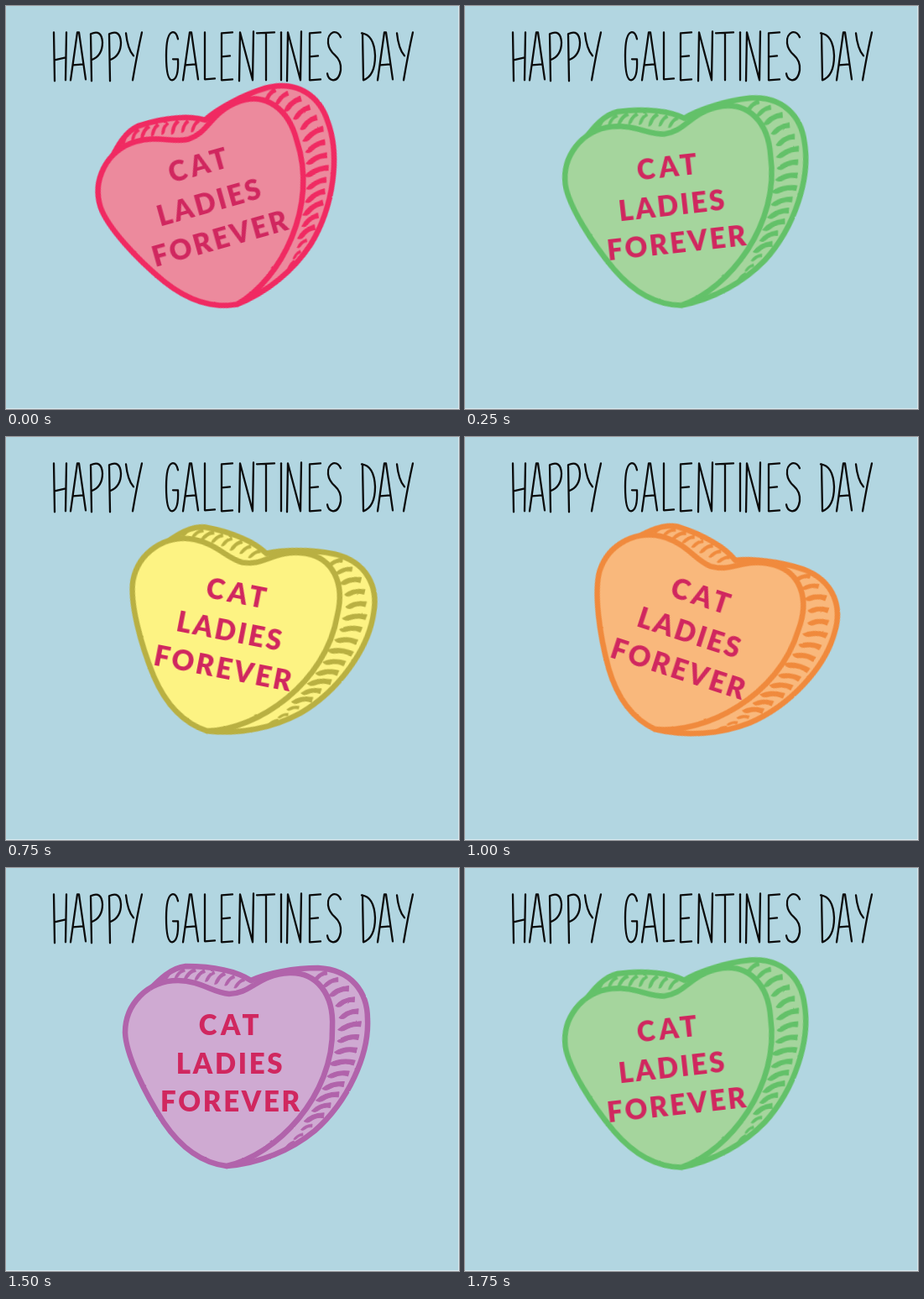
Write an HTML page that moves like this. It is 540x480 px and loops after 2000 ms.

```html
<!DOCTYPE html>
<html lang="en">
<head>
<meta charset="utf-8">
<title>Happy Galentines Day</title>
<style>
  html, body { margin: 0; width: 100%; height: 100%; overflow: hidden; background: #fff; }
  svg { display: block; width: 540px; height: 480px; }
  #title path { fill: none; stroke: #0b0b0b; stroke-width: 2.3; stroke-linecap: round; stroke-linejoin: round; }
  .shell { stroke: currentColor; stroke-width: 6.5; stroke-linejoin: round; }
  #hatch { fill: currentColor; stroke: currentColor; stroke-width: 1; stroke-linejoin: round; }
  #words { font: 900 33px Lato, "Open Sans", sans-serif; letter-spacing: 2.7px; text-anchor: middle; fill: #d0275f; }
  #words .wide { letter-spacing: 4.5px; }
</style>
</head>
<body>
<svg viewBox="0 0 540 480">
  <defs>
    <filter id="rough" x="-5%" y="-5%" width="110%" height="110%">
      <feTurbulence type="fractalNoise" baseFrequency=".14" numOctaves="2" seed="4"/>
      <feDisplacementMap in="SourceGraphic" scale="1.6" xChannelSelector="R" yChannelSelector="G"/>
    </filter>
  </defs>
  <rect width="539.5" height="479.5" fill="#b2d6e1"/>
  <g id="title" role="img" aria-label="HAPPY GALENTINES DAY" transform="translate(0 -.7)"></g>
  <g id="heart">
    <g transform="translate(-266 -233)" filter="url(#rough)">
      <path class="shell" d="M168 148C180 136 195 119 214 117C240 117 270 120 292 134C310 125 345 119 372 119C412 121 431 148 431 180C433 222 408 278 368 313C340 336 302 352 263 355Z"/>
      <g id="hatch"></g>
      <path class="shell" d="M266 150C245 148 232 134 205 134C168 134 142 163 142 196C143 222 165 268 188 303C207 331 232 351 263 355C322 342 391 272 389 190C391 150 370 124 338 125C300 127 292 150 266 150Z"/>
    </g>
  </g>
  <g id="words">
    <text class="wide" x="2" y="-34">CAT</text>
    <text x="1.5" y="12">LADIES</text>
    <text x="2.5" y="57">FOREVER</text>
  </g>
</svg>
<script>
const NS = 'http://www.w3.org/2000/svg';
const $ = id => document.getElementById(id);

function addPath(parent, d, transform) {
  const p = document.createElementNS(NS, 'path');
  p.setAttribute('d', d);
  if (transform) p.setAttribute('transform', transform);
  parent.append(p);
}

// Tall thin hand lettering
const glyphs = {
  H: 'M1 32L2 90M16 32L15 89M2 65L15 62',
  A: 'M0 89L8 32L10 32L18 88M3 71L15 70',
  P: 'M2 90L1 34Q14 28 15 44Q15 60 2 65',
  Y: 'M1 33Q3 52 10 60M20 32Q15 54 9 89',
  G: 'M15 40Q13 31 8 32Q1 34 1 60Q1 89 8 89Q16 88 15 64L9 64',
  L: 'M1 32L1 88L13 87',
  E: 'M14 32L1 33L1 89L14 88M1 61L11 60',
  N: 'M1 90L2 32L17 89L18 31',
  T: 'M0 33L21 32M11 33L11 89',
  I: 'M1 32L1 89',
  S: 'M17 38Q14 31 8 32Q1 35 2 45Q3 53 10 59Q18 66 17 77Q15 89 8 89Q2 88 1 81',
  D: 'M1 33L2 89Q16 84 16 60Q15 35 0 33'
};
const line = 'HAPPYGALENTINESDAY';
const lineX = [56, 77, 100, 122, 142, 190, 211, 236, 256, 277, 299, 327, 334, 361, 382, 424, 443, 465];
lineX.forEach((x, i) => addPath($('title'), glyphs[line[i]], `translate(${x})`));

// Crayon strokes spread along the middle of each visible side
function hatch(d, count, angle, size) {
  const mid = document.createElementNS(NS, 'path');
  mid.setAttribute('d', d);
  const len = mid.getTotalLength();
  for (let i = 0; i < count; i++) {
    const t = i / (count - 1);
    const p = mid.getPointAtLength(t * len);
    const turn = angle(t) + 4 * Math.sin(i * 7.3);
    const s = size(t) * (1 + 0.08 * Math.sin(i * 4.1));
    addPath($('hatch'), 'M-14 4Q-5 -5 13 -5L12 1Q3 -1 -5 4Q-10 7 -14 4Z',
      `translate(${p.x} ${p.y}) rotate(${turn}) scale(${s} ${Math.min(1, s + 0.1)})`);
  }
}
hatch('M374 129C398 138 412 165 410 190C407 228 388 284 338 330', 17,
  t => -18 + 24 * Math.sin(Math.PI * t),
  t => t > 0.85 ? 0.5 : 0.75 + 0.25 * Math.sin(Math.PI * t));
hatch('M195 126C215 124 248 128 278 137', 8, () => -28, () => 0.6);

// Rocking poses as [x, y, tilt]; the words sit a little looser than the candy
const poses = [
  { heart: [242, 238, -17.3], words: [241.5, 234, -15.7], fill: '#ec8a9d', color: '#f02a62' },
  { heart: [247, 235, -6.6], words: [246, 237.5, -6.3], fill: '#a5d59d', color: '#63c169' },
  { heart: [266, 233, 0], words: [266, 233, 0], fill: '#cfaad2', color: '#b164ab' },
  { heart: [266, 231, 11], words: [266, 231, 11], fill: '#fdf383', color: '#b9b043' },
  { heart: [267, 233, 18], words: [267, 233, 18], fill: '#f9b87c', color: '#f08a3c' }
];
const order = [0, 1, 2, 3, 4, 3, 2, 1, 0];

function rock(id, extra) {
  const steps = order.map((n, i) => {
    const [x, y, tilt] = poses[n][id];
    return {
      offset: i / 8, easing: 'step-end', ...extra(poses[n]),
      transform: `translate(${x}px, ${y}px) rotate(${tilt}deg)`
    };
  });
  $(id).animate(steps, { duration: 2000, iterations: Infinity });
}
rock('heart', ({ fill, color }) => ({ fill, color }));
rock('words', () => ({}));
</script>
</body>
</html>
```
